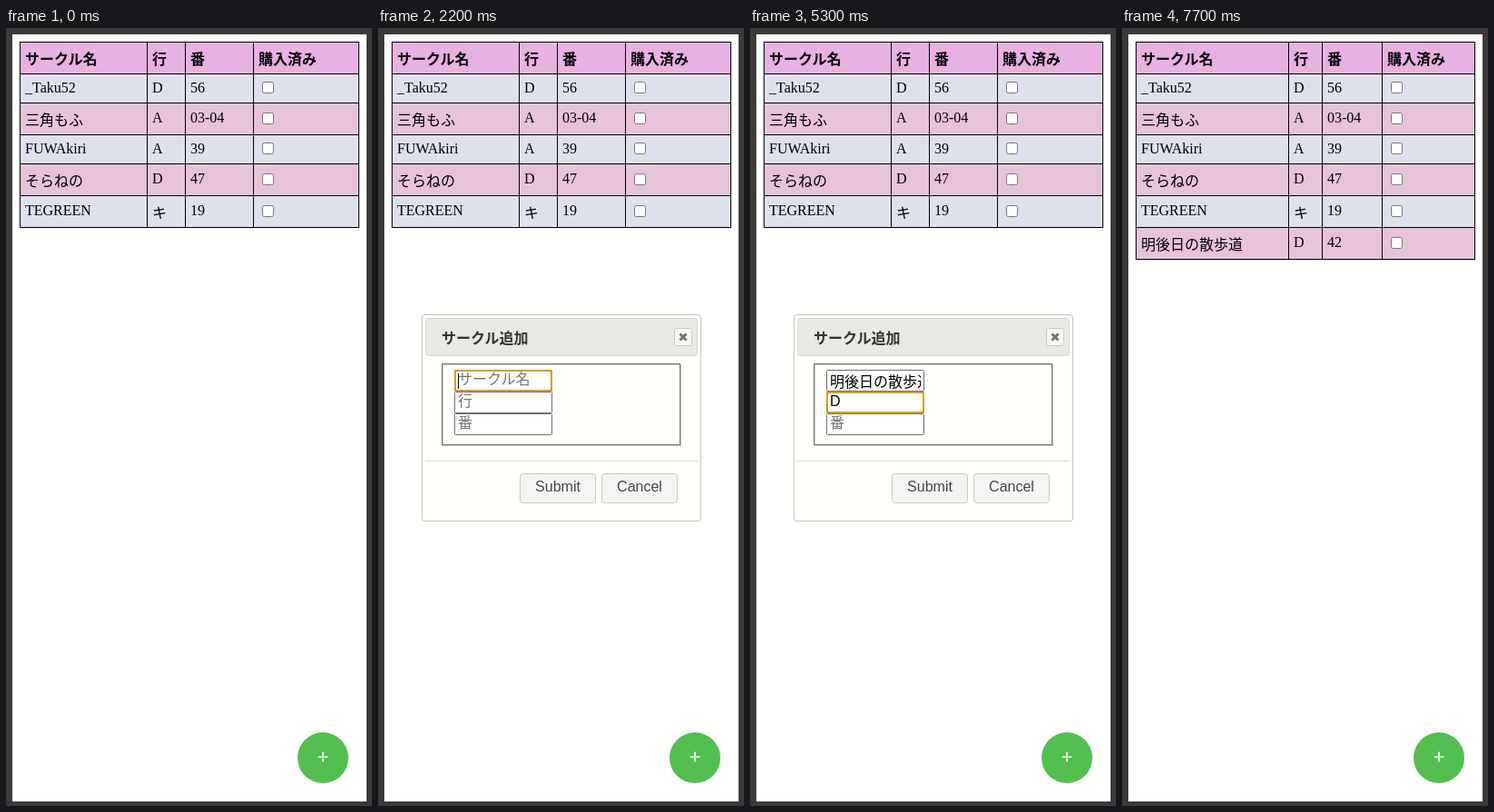
These frames come from a looping animation (403x856 px, 8000 ms). An HTML page:

```html
<!DOCTYPE html>
<html lang="ja">
<head>
<meta charset="utf-8">
<style>
  html, body { margin: 0; width: 100%; height: 100%; overflow: hidden; background: #3b3a39; }
  svg { display: block; }
  text { font: 16px "Liberation Sans", "Noto Sans CJK JP", "Noto Sans CJK", sans-serif; white-space: pre; }
  .cell { font-family: "Liberation Serif", "Noto Sans CJK JP", "Noto Sans CJK", serif; }
  .bold { font-weight: bold; }
  .popup { font: 500 15.5px "Noto Sans", sans-serif; }
</style>
</head>
<body>
<svg id="stage" width="403" height="856" viewBox="0 0 403 856"></svg>
<script>
const LOOP = 8000;
const NEW_NAME = '明後日の散歩道';
const HEADER = ['サークル名', '行', '番', '購入済み'];
const ROWS = [
  ['_Taku52', 'D', '56'],
  ['三角もふ', 'A', '03-04'],
  ['FUWAkiri', 'A', '39'],
  ['そらねの', 'D', '47'],
  ['TEGREEN', 'キ', '19'],
];
const MENU = [['Show list', 94], ['Show map', 106], ['Clear plot', 99], ['Calc dist', 92],
  ['Add Row', 95], ['Filter', 66], ['Reset csv', 101]];

// Stepped timelines: [time, value]
const MENU_FADE = [[800, .33], [900, .67], [1000, 1], [2200, 0]];
const CARET = [[2200, 1], [2700, 0], [3100, 1], [3600, 0], [4000, 1], [4600, 0], [4800, 1], [5300, 0], [5800, 1]];
const POPUP_FADE = [[4000, .35], [4100, .75], [4200, 1], [4800, .85], [4900, .5], [5000, .2], [5100, 0],
  [5800, 1], [6000, .8], [6100, .53], [6500, 0]];
const FOCUS = [[4000, 1], [5800, 2]];
const NUMBER = [[6000, '4'], [6500, '42']];

const valueAt = (steps, t, start = 0) => steps.reduce((value, [time, next]) => t >= time ? next : value, start);
const isWide = s => /[^\x00-\x7f]/.test(s);

const box = (x, y, w, h, fill, stroke = 'none', r = 0, more = '') =>
  `<rect x="${x}" y="${y}" width="${w}" height="${h}" rx="${r}" fill="${fill}" stroke="${stroke}" ${more}/>`;
// One-pixel outline lying inside the given bounds
const framed = (x, y, w, h, fill, stroke, r) => box(x + .5, y + .5, w - 1, h - 1, fill, stroke, r);
const label = (x, y, s, fill = '#000', more = '') => `<text x="${x}" y="${y}" fill="${fill}" ${more}>${s}</text>`;

function table(rows, cols) {
  let top = 15, out = '';
  [HEADER, ...rows].forEach((row, i) => {
    const tall = row.some(isWide), height = tall ? 35 : 32;
    const fill = !i ? '#e9b1e1' : i % 2 ? '#dfe0ee' : '#e7c3da';
    for (let c = 0; c < 4; c++) {
      const x = cols[c];
      out += box(x + .5, top + .5, cols[c + 1] - x, height, fill, '#000');
      if (row[c]) {
        const y = top + (isWide(row[c]) ? 25 : tall ? 22 : 21);
        out += label(x + 6, y, row[c], '#000', `class="cell${i ? '' : ' bold'}"`);
      } else out += framed(x + 10, top + (tall ? 11 : 9), 13, 13, '#fff', '#767676', 2);
    }
    top += height;
  });
  return out;
}

function menu(opacity) {
  const items = MENU.map(([name, width], i) =>
    box(269, 485 + 40 * i, width, 32, '#52be50', 'none', 4) + label(284, 505 + 40 * i, name, '#fafff8'));
  return `<g opacity="${opacity}">${items.join('')}</g>`;
}

function inputs(t) {
  const focus = valueAt(FOCUS, t);
  const fields = [
    ['サークル名', t >= 3100 ? NEW_NAME : ''],
    ['行', t >= 4800 ? 'D' : ''],
    ['番', valueAt(NUMBER, t, '')],
  ];
  let out = '';
  fields.forEach((_, i) => out += framed(84, 376 + 24 * i, 108, 24, '#fff', '#6e6e6e', 1));
  out += box(85, 377 + 24 * focus, 106, 22, '#fff', '#e09a10', 2, 'stroke-width="2"');
  fields.forEach(([hint, value], i) => {
    const active = i === focus;
    const width = isWide(value) ? 16 * value.length : value === 'D' ? 11 : 9 * value.length;
    const x = active ? Math.min(88, 187 - width) : 88;
    const y = 392 + 24 * i + (value ? isWide(value) ? 3 : i === 2 ? 1 : 0 : 0);
    out += `<g clip-path="url(#field)">${label(x, y, value || hint, value ? '#000' : '#757575')}</g>`;
    if (active && valueAt(CARET, t)) out += box(x + width, 380 + 24 * i + (i ? -1 : value ? 2 : 0), 1, 17, '#000');
  });
  return out;
}

function dialog(t) {
  return framed(48, 315, 308, 228, '#fffffb', '#c3c3bf', 3)
    + framed(52, 319, 300, 42, '#e8e8e4', '#d6d6d2', 3)
    + label(70, 347, 'サークル追加', '#333', 'class="bold"')
    + framed(326, 330, 20, 20, '#f5f5f3', '#c8c8c4', 2)
    + '<path d="M332.5 336.5l7 7m0-7l-7 7" stroke="#74746f" stroke-width="3"/>'
    + box(71.5, 370.5, 262, 89, 'none', '#c0c0c0')
    + box(70.5, 369.5, 262, 89, 'none', '#777')
    + box(52, 476, 300, 1, '#dadad6')
    + [['Submit', 156], ['Cancel', 246]].map(([name, x]) =>
        framed(x, 490, 84, 33, '#f4f4f2', '#c8c8c4', 3)
        + label(x + 42, 510, name, '#454545', 'text-anchor="middle"')).join('')
    + inputs(t);
}

function popup(t) {
  const opacity = valueAt(POPUP_FADE, t), scale = .957 + .043 * opacity;
  return `<g opacity="${opacity}" style="filter:drop-shadow(0 1px 2px #0006)"
      transform="translate(213 ${t >= 5800 ? 476 : 452}) scale(${scale}) translate(-213 -452)">
    <path d="M128 435L138 426L148 435" fill="#1b1c18"/>`
    + box(117, 434, 192, 44, '#1b1c18', 'none', 5)
    + label(129, 462, 'kumorinosorairo', '#f0f0ee', 'class="popup"') + '</g>';
}

function scene(t) {
  const added = t >= 6900, menuOpacity = valueAt(MENU_FADE, t);
  return '<clipPath id="field"><rect x="88" y="370" width="100" height="90"/></clipPath>'
    + box(0, 0, 403, 856, '#3b3a39')
    + box(7, 7, 390, 844, '#fffffd')
    + (added ? table([...ROWS, [NEW_NAME, 'D', '42']], [15, 183, 220, 286, 388])
             : table(ROWS, [15, 155, 197, 272, 388]))
    + '<circle cx="349" cy="803" r="28" fill="#52be50"/>'
    + '<path d="M343.5 802h11M349 796.5v11" stroke="#fafff8" stroke-width="1.7"/>'
    + (menuOpacity ? menu(menuOpacity) : '')
    + (t >= 2200 && !added ? dialog(t) + (valueAt(POPUP_FADE, t) ? popup(t) : '') : '');
}

const stage = document.getElementById('stage');
let shown = '';
function tick() {
  const markup = scene(performance.now() % LOOP);
  if (markup !== shown) stage.innerHTML = shown = markup;
  requestAnimationFrame(tick);
}
tick();
</script>
</body>
</html>
```
